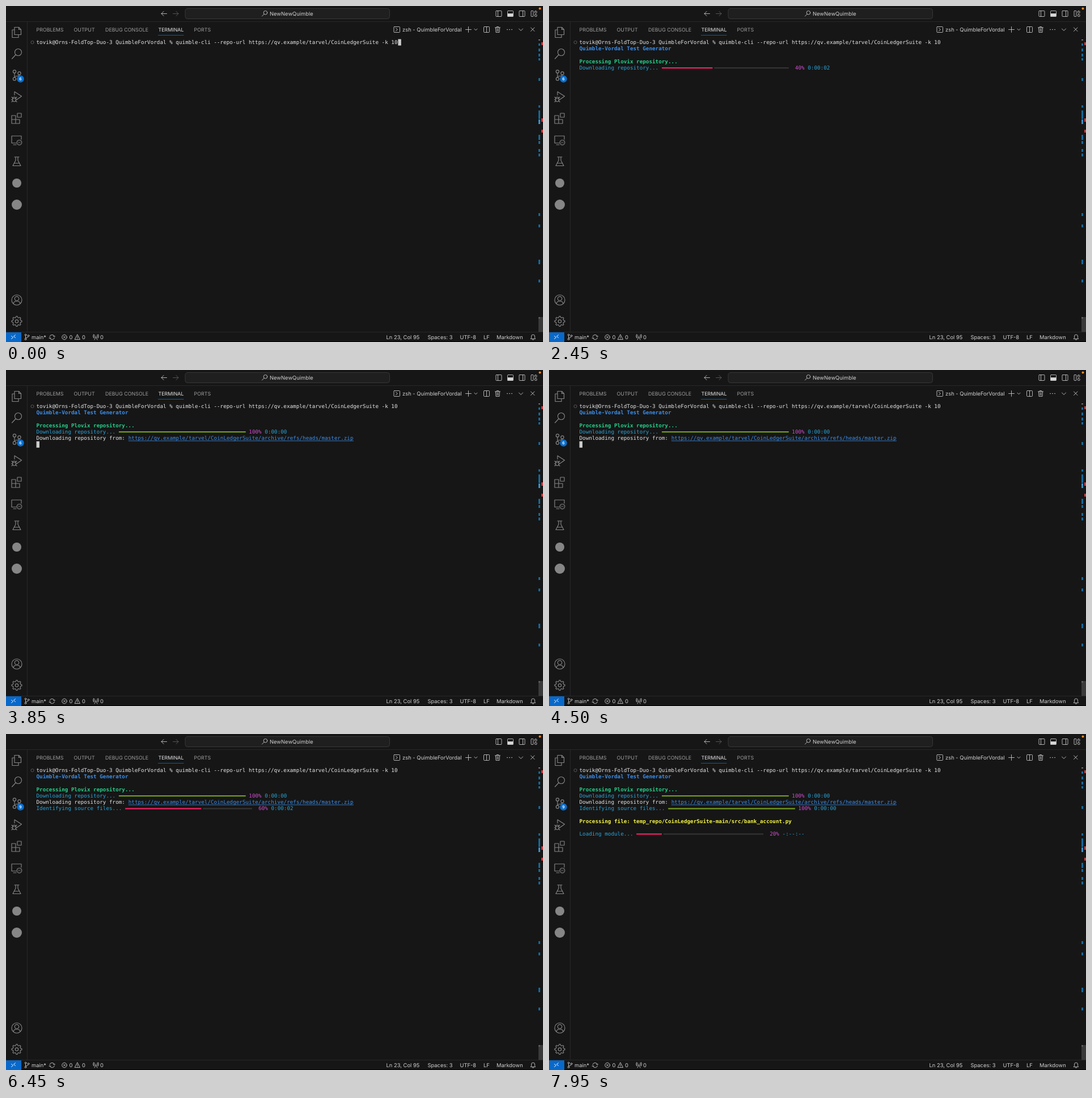
Recreate the animation shown at these times as an HTML page. Size 947x592 px, loop 8000 ms.

```html
<!DOCTYPE html>
<html lang="en">
<head>
<meta charset="utf-8">
<title>Terminal run</title>
<style>
html, body { margin: 0; width: 100%; height: 100%; overflow: hidden; background: #161616; }
svg { display: block; width: 947px; height: 592px; }
text { white-space: pre; text-rendering: geometricPrecision; }
.ui { font: 9.4px Inter, Roboto, sans-serif; fill: #d0d0d0; }
.tab { font-size: 8.9px; fill: #9d9d9d; }
.term { font: 9.294px "DejaVu Sans Mono", "Liberation Mono", monospace; fill: #e4e4e4; }
.bold { font-weight: bold; }
.icon { fill: none; stroke: #c5c5c5; stroke-width: 0.9; stroke-linejoin: round; stroke-linecap: round; }
.side { stroke: #868686; stroke-width: 1.15; }
</style>
</head>
<body>
<svg viewBox="0 0 947 592">
  <rect width="947" height="592" fill="#161616"/>
  <path d="M0 27.5H947M37.5 28V574M0 574.5H947" stroke="#282828"/>
  <rect y="591" width="947" height="1" fill="#000"/>

  <!-- title bar -->
  <g class="icon">
    <path d="M283.500 13.500H274M278 9.500L274 13.500L278 17.500"/>
    <path d="M294.500 13.500H304M300 9.500L304 13.500L300 17.500" stroke="#5c5c5c"/>
    <rect x="316" y="4.500" width="360.500" height="18" rx="4" fill="#1f1f1f" stroke="#3a3a3a"/>
    <circle cx="457.500" cy="11.800" r="3.300"/><path d="M455.200 14.200L451.500 18"/>
    <rect x="864" y="8.500" width="10" height="10" rx="1"/><path d="M867.500 8.500V18.500"/>
    <rect x="884.500" y="8.500" width="10" height="10" rx="1"/>
    <rect x="885" y="13.500" width="9" height="5" fill="#d7d7d7"/>
    <rect x="905" y="8.500" width="10" height="10" rx="1"/><path d="M911.500 8.500V18.500"/>
    <rect x="926" y="8.500" width="4" height="10" rx="1"/>
    <rect x="932.500" y="9" width="3.500" height="3.500" rx="1"/>
    <rect x="932.500" y="15" width="3.500" height="3.500" rx="1"/>
  </g>
  <circle cx="941.500" cy="4.500" r="2" fill="#ee8a2a"/>
  <text class="ui" x="465" y="17">NewNewQuimble</text>

  <!-- panel header -->
  <g class="ui">
    <text class="tab" x="53.500" y="45">PROBLEMS</text>
    <text class="tab" x="119.500" y="45">OUTPUT</text>
    <text class="tab" x="175" y="45">DEBUG CONSOLE</text>
    <text class="tab" x="268.500" y="45" style="fill:#e7e7e7">TERMINAL</text>
    <text class="tab" x="331.500" y="45">PORTS</text>
    <text x="699" y="45">zsh - QuimbleForVordal</text>
  </g>
  <rect x="268" y="51" width="45.500" height="0.770" fill="#0b72c9"/>
  <g class="icon">
    <rect x="684" y="36.500" width="10.500" height="10" rx="1"/><path d="M687.500 39L690.500 41.500L687.500 44"/>
    <path d="M815.500 36.500V46.500M810.500 41.500H820.500M826 40.200L828.500 42.800L831 40.200"/>
    <rect x="842.500" y="36.500" width="10" height="10" rx="1"/><path d="M847.500 36.500V46.500"/>
    <path d="M862.500 38H871.500M865.500 38V36.500H868.500V38M863.500 38L864 46.500H870L870.500 38M866 40V44.500M868 40V44.500"/>
    <path d="M904.500 40L908 43.500L911.500 40M925.500 38L932 44.500M932 38L925.500 44.500"/>
    <path d="M884 41.500h.1M888 41.500h.1M892 41.500h.1" stroke-width="1.600"/>
  </g>

  <!-- activity bar -->
  <g class="icon side">
    <path d="M15 37.500H22.500L26.500 41.500V50.500H15ZM22.500 37.500V41.500H26.500M15 42H11V55.500H22V50.500"/>
    <circle cx="21.500" cy="81.500" r="6"/><path d="M17 86L10.500 93"/>
    <circle cx="15" cy="115.500" r="2.600"/><circle cx="15" cy="128.500" r="2.600"/><circle cx="23.500" cy="118.500" r="2.600"/>
    <path d="M15 118.200V125.800M23.500 121.200C23.500 125 15 122 15 125.800"/>
    <path d="M15 157V151L27.500 159L19.500 164.500"/>
    <ellipse cx="14.500" cy="164.500" rx="3" ry="4"/><path d="M11.500 163H17.500M10 160.500L12 162M19 160.500L17 162M9.500 165H11.500M17.500 165H19.500M10 169L12 167M19 169L17 167"/>
    <path d="M10 193H17V207H10ZM10 200H24V207H17M24 200V207"/><rect x="20" y="189" width="7" height="7" rx=".6"/>
    <path d="M18 241.500H10V229H27V235M13 244.500H18"/>
    <circle cx="23.500" cy="240.500" r="4.300"/><path d="M21.500 239L23 240.500L21.500 242M25.500 239L24 240.500L25.500 242" stroke-width=".8"/>
    <path d="M15 266H23M17 266V272L12 281.500H26L21 272V266M14.500 277H23.500"/>
    <circle cx="19" cy="518" r="9"/><circle cx="19" cy="515.500" r="3.700"/><path d="M13 524.500C14 518.500 24 518.500 25 524.500"/>
    <circle cx="19" cy="555.500" r="2.700"/><path id="gear"/>
  </g>
  <circle cx="19" cy="312" r="8" fill="#868686"/>
  <circle cx="19" cy="350" r="9" fill="#868686"/>
  <circle cx="25.500" cy="128.500" r="6.200" fill="#0b6fce"/>
  <text id="badge" class="ui" x="25.500" y="131" text-anchor="middle" style="font-size:7px;font-weight:600;fill:#fff"></text>

  <!-- status bar -->
  <rect y="575" width="27" height="17" fill="#0869cb"/>
  <g class="icon">
    <path d="M9.500 581.500L12.500 584L9.500 586.500M16.500 579.500L13.500 582L16.500 584.500" stroke="#fff"/>
    <circle cx="34.500" cy="579.500" r="1.400"/><circle cx="34.500" cy="587" r="1.400"/><circle cx="39.500" cy="581" r="1.400"/>
    <path d="M34.500 581V585.500M39.500 582.500C39.500 585 34.500 583.500 34.500 585.500"/>
    <path d="M77 582.500A4.400 4.400 0 0 1 85.300 582M85.500 584.500A4.400 4.400 0 0 1 77.200 585M83.500 582H86.500M76 585H79"/>
    <circle cx="103" cy="583.500" r="4.300"/><path d="M101.300 581.800L104.700 585.200M104.700 581.800L101.300 585.200"/>
    <path d="M126 579L130.500 587.500H121.500ZM126 582V584.500M126 586V586.100"/>
    <path d="M158.500 583L156 588M158.500 583L161 588M155.500 585.500M156 579.500Q154.500 581.500 156 584M161 579.500Q162.500 581.500 161 584M154.500 578.500Q152.500 581.500 154.500 585M162.500 578.500Q164.500 581.500 162.500 585M158.500 581.500V582"/>
    <path d="M925.500 586.500H933.500L932.500 584.500V582A3 3 0 0 0 926.500 582V584.500ZM928.500 588H930.500"/>
  </g>
  <g class="ui">
    <text x="45" y="587">main*</text>
    <text x="111.500" y="587">0</text><text x="134" y="587">0</text><text x="166" y="587">0</text>
    <text x="670.500" y="587">Ln 23, Col 95</text>
    <text x="743.500" y="587">Spaces: 3</text>
    <text x="800.500" y="587">UTF-8</text>
    <text x="842" y="587">LF</text>
    <text x="865" y="587">Markdown</text>
  </g>

  <g id="ruler"></g>
  <circle cx="46.500" cy="64" r="2.600" fill="none" stroke="#5e5e5e" stroke-width=".9"/>
  <g id="term" class="term"></g>
  <rect id="cursor" width="5.400" height="11.200" fill="#cccccc"/>
</svg>
<script>
const LOOP = 8000, CELL = 5.595, LEFT = 53.5, ROW = 11.2, TOP = 58.4, BAR = 40;
const BLUE = '#3b8eea', CYAN = '#29a4d8', GREEN = '#23d18b', YELLOW = '#f5f543', MAGENTA = '#d04fd0';
const ENTER = 900, START = 1350, FETCHED = 3800, SCAN = 4650, LOAD = 7100, BADGE = 6000;
const ETA = ['-:--:--', '-:--:--', '0:00:02', '0:00:02', '0:00:01', '0:00:00'];
const $ = id => document.getElementById(id);
const term = $('term');
const col = n => LEFT + n * CELL;

function add(parent, tag, attrs) {
  const el = document.createElementNS('http://www.w3.org/2000/svg', tag);
  for (const key in attrs) el.setAttribute(key, attrs[key]);
  return parent.appendChild(el);
}

function show(el, on) {
  el.setAttribute('visibility', on ? 'visible' : 'hidden');
}

function write(parent, row, column, string, color, bold) {
  const el = add(parent, 'text', { x: col(column), y: TOP + row * ROW + 8.8 });
  if (color) el.style.fill = color;
  if (bold) el.setAttribute('class', 'bold');
  el.textContent = string;
  return el;
}

function line(from, ...args) {
  const el = write(term, ...args);
  return t => show(el, t >= from);
}

function link(from, row, column, string) {
  const g = add(term, 'g', {});
  write(g, row, column, string, BLUE);
  add(g, 'rect', {
    x: col(column), y: TOP + row * ROW + 10.1, width: string.length * CELL, height: 0.8, fill: BLUE
  });
  return t => show(g, t >= from);
}

// Progress row: each entry in times adds another 20 %.
function progress(row, label, times) {
  const g = add(term, 'g', {});
  const start = label.length + 1;
  write(g, row, 0, label, CYAN);
  const y = TOP + row * ROW + 4.8;
  const rest = add(g, 'rect', { y, height: 2.2, fill: '#343434' });
  const done = add(g, 'rect', { x: col(start), y, height: 2.2 });
  const percent = write(g, row, start + BAR + 1, '', MAGENTA);
  const eta = write(g, row, start + BAR + 6, '', CYAN);
  return t => {
    const step = times.filter(at => t >= at).length - 1;
    show(g, step >= 0);
    if (step < 0) return;
    const filled = step * BAR / 5;
    const gap = step > 0 && step < 5 ? 0.5 : 0;
    done.setAttribute('width', filled * CELL);
    done.setAttribute('fill', step === 5 ? '#729c1f' : '#ee2264');
    rest.setAttribute('x', col(start + filled + gap));
    rest.setAttribute('width', (BAR - filled - gap) * CELL);
    percent.textContent = String(step * 20).padStart(3) + '%';
    eta.textContent = ETA[step];
  };
}

const repo = 'https://qv.example/tarvel/CoinLedgerSuite';
const command = 'tovik@Orns-FoldTop-Duo-3 QuimbleForVordal % quimble-cli --repo-url ' + repo + ' -k 10';

const parts = [
  line(0, 0, 0, command),
  line(START, 1, 0, 'Quimble-Vordal Test Generator', BLUE, true),
  line(START, 3, 0, 'Processing Plovix repository...', GREEN, true),
  progress(4, 'Downloading repository...', [START, 1850, 2400, 2950, 3400, FETCHED]),
  line(FETCHED, 5, 0, 'Downloading repository from:'),
  link(FETCHED, 5, 29, repo + '/archive/refs/heads/master.zip'),
  progress(6, 'Identifying source files...', [SCAN, 5150, 5650, 6150, 6650, LOAD]),
  line(LOAD, 8, 0, 'Processing file: temp_repo/CoinLedgerSuite-main/src/bank_account.py', YELLOW, true),
  progress(10, 'Loading module...', [LOAD, 7600])
];

function drawRuler() {
  const mark = (x, y, width, height, fill) => add($('ruler'), 'rect', { x, y, width, height, fill });
  const blue = [[66, 4], [75, 5], [84, 5], [92, 4], [127, 5], [175, 4], [184, 15], [227, 9], [238, 5],
    [252, 5], [260, 5], [365, 5], [385, 5], [447, 8], [482, 5]];
  for (const [y, h] of blue) mark(939, y, 3, h, '#126a9e');
  mark(939, 200, 3, 8, '#3c8fc4');
  mark(939, 59, 3, 1.5, '#8c8c8c');
  for (const y of [64, 198, 218]) mark(944, y, 3, y === 198 ? 6 : 5, '#d0393c');
  mark(939, 548, 8, 26, '#3a3a3a');
  mark(939, 548, 3, 3, '#5a5a5a');
}

function drawGear() {
  let d = '';
  for (let i = 0; i < 32; i++) {
    const a = (i - 0.5) * Math.PI / 16;
    const r = i % 4 < 2 ? 9 : 6.8;
    d += (i ? 'L' : 'M') + (19 + r * Math.cos(a)).toFixed(2) + ' ' + (555.5 + r * Math.sin(a)).toFixed(2);
  }
  $('gear').setAttribute('d', d + 'Z');
}

function update(t) {
  for (const part of parts) part(t);
  $('badge').textContent = t < BADGE ? '6' : '9';
  const [row, column] = t < ENTER ? [0, command.length] : t < START ? [1, 0] : [6, 0];
  const cursor = $('cursor');
  cursor.setAttribute('x', col(column) + 0.1);
  cursor.setAttribute('y', TOP + row * ROW);
  show(cursor, t < START || (t >= FETCHED && t < SCAN));
}

function frame() {
  update(performance.now() % LOOP);
  requestAnimationFrame(frame);
}

drawRuler();
drawGear();
frame();
</script>
</body>
</html>
```
